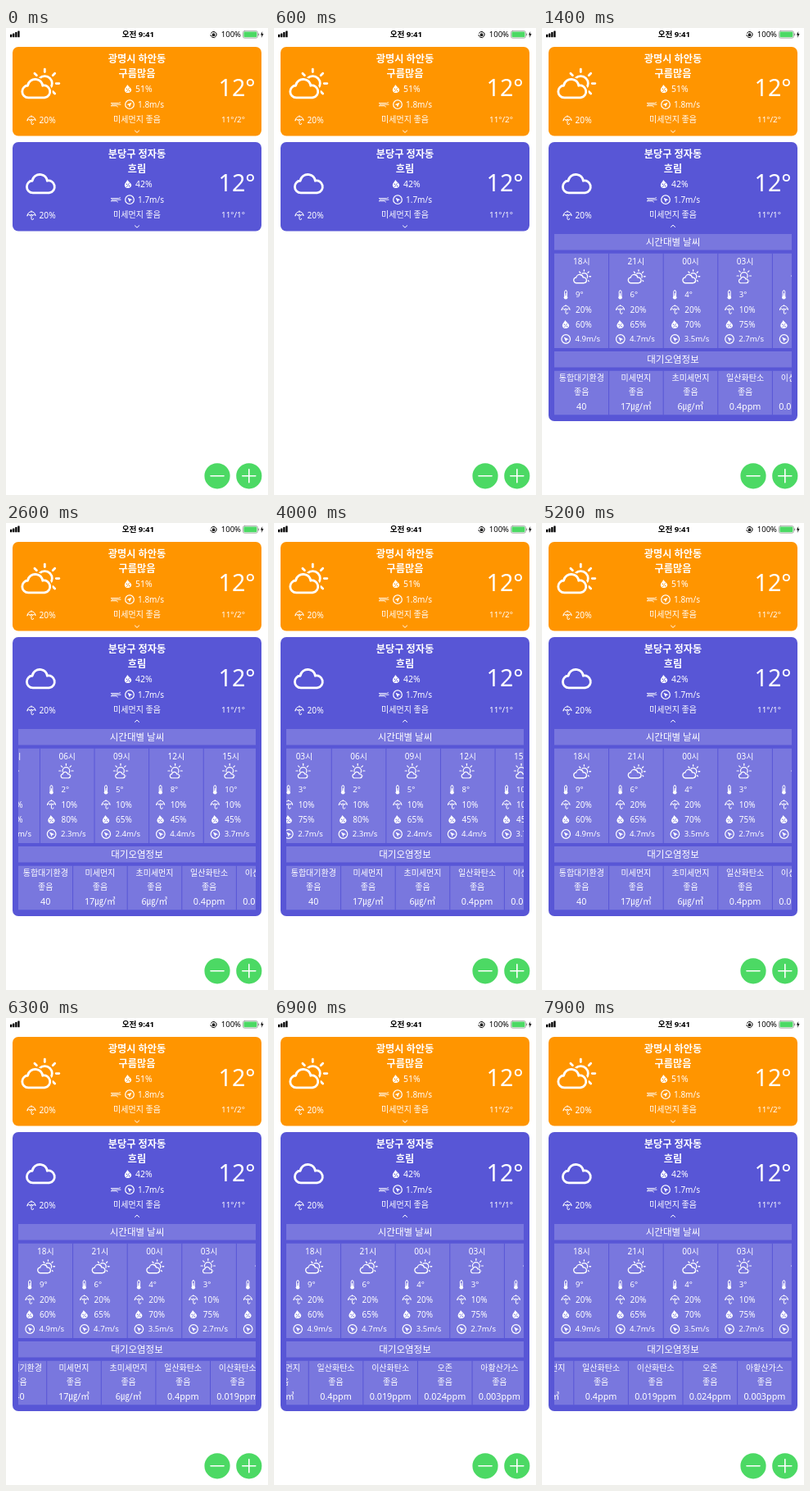
Write an HTML page with a canvas that moves like this. It is 320 px wide and 569 px high and loops after 8 s.

```html
<!DOCTYPE html>
<html lang="ko">
<head>
<meta charset="utf-8">
<title>날씨</title>
<style>
html, body { margin: 0; width: 100%; height: 100%; overflow: hidden; background: #fff; }
canvas { display: block; width: 320px; height: 569px; }
</style>
</head>
<body>
<canvas id="stage"></canvas>
<script>
const W = 320, H = 569, LOOP = 8000, COL = 66.6;
const ORANGE = '#ff9500', INDIGO = '#5856d6', PANEL = '#7977de', GREEN = '#4cd964';
const FONT = '"Noto Sans", "Noto Sans CJK KR", sans-serif';
const canvas = document.getElementById('stage');
const ctx = canvas.getContext('2d');
const dpr = window.devicePixelRatio || 1;
canvas.width = W * dpr;
canvas.height = H * dpr;

const hours = [
  ['18', 9, 20, 60, '4.9'], ['21', 6, 20, 65, '4.7'],
  ['00', 4, 20, 70, '3.5'], ['03', 3, 10, 75, '2.7'],
  ['06', 2, 10, 80, '2.3'], ['09', 5, 10, 65, '2.4'],
  ['12', 8, 10, 45, '4.4'], ['15', 10, 10, 45, '3.7']
];
const air = [
  ['통합대기환경', '40'], ['미세먼지', '17㎍/㎥'], ['초미세먼지', '6㎍/㎥'],
  ['일산화탄소', '0.4ppm'], ['이산화탄소', '0.019ppm'],
  ['오존', '0.024ppm'], ['아황산가스', '0.003ppm']
];

const rad = d => d * Math.PI / 180;
const ease = u => u < 0.5 ? 2 * u * u : 1 - 2 * (1 - u) * (1 - u);
const ramp = (t, from, to) => ease(Math.min(1, Math.max(0, (t - from) / (to - from))));

function text(s, x, y, size, align = 'center', weight = 400, color = '#fff') {
  ctx.font = `${weight} ${size}px ${FONT}`;
  ctx.textAlign = align;
  ctx.fillStyle = color;
  ctx.fillText(s, x, y + size * 0.36);
}

function box(x, y, w, h, r, color) {
  ctx.fillStyle = color;
  ctx.beginPath();
  ctx.roundRect(x, y, w, h, r);
  ctx.fill();
}

function disc(x, y, r, color) {
  ctx.fillStyle = color;
  ctx.beginPath();
  ctx.arc(x, y, r, 0, 7);
  ctx.fill();
}

function line(points, width, color = '#fff') {
  ctx.strokeStyle = color;
  ctx.lineWidth = width;
  ctx.beginPath();
  points.forEach(([x, y]) => ctx.lineTo(x, y));
  ctx.stroke();
}

// Draws with the origin moved to (x, y)
function at(x, y, scale, draw) {
  ctx.save();
  ctx.translate(x, y);
  ctx.scale(scale, scale);
  draw();
  ctx.restore();
}

function cloud(x, y, scale, width, bg) {
  at(x, y, scale, () => {
    ctx.beginPath();
    ctx.arc(8, 17, 8, rad(90), rad(265));
    ctx.arc(17, 11, 10, rad(190), rad(350));
    ctx.arc(28.5, 17, 8, rad(-102), rad(90));
    ctx.closePath();
    ctx.fillStyle = bg;
    ctx.strokeStyle = bg;
    ctx.lineWidth = width / scale * 2.2;
    ctx.fill();
    ctx.stroke();
    ctx.strokeStyle = '#fff';
    ctx.lineWidth = width / scale;
    ctx.stroke();
  });
}

function sun(x, y, r, inner, outer, width, angles) {
  ctx.strokeStyle = '#fff';
  ctx.lineWidth = width;
  ctx.beginPath();
  ctx.arc(x, y, r, 0, 7);
  ctx.stroke();
  for (const a of angles) {
    const c = Math.cos(rad(a)), s = Math.sin(rad(a));
    line([[x + c * inner, y + s * inner], [x + c * outer, y + s * outer]], width);
  }
}

function cloudySun(x, y, scale, width, bg) {
  const k = scale / 0.93;
  sun(x + 27.5 * k, y + 6 * k, 9 * k, 14 * k, 17.5 * k, width, [-135, -90, -45, 0, 45]);
  cloud(x, y, scale, width, bg);
}

function sunnyCloud(x, y) {
  sun(x, y, 4.3, 6.5, 8.7, 1.2, [-180, -135, -90, -45, 0, 45]);
  cloud(x - 6.3, y + 1, 0.31, 1.2, PANEL);
}

function umbrella(x, y) {
  at(x, y, 1, () => {
    ctx.strokeStyle = '#fff';
    ctx.lineWidth = 1;
    ctx.beginPath();
    ctx.arc(0, 0.5, 5, Math.PI, 0);
    for (const cx of [3.4, 0, -3.4]) ctx.arc(cx, 0.5, 1.6, 0, Math.PI, true);
    ctx.moveTo(0, -5.4);
    ctx.lineTo(0, -4.4);
    ctx.moveTo(0, 0);
    ctx.lineTo(0, 4);
    ctx.arc(1.3, 4, 1.3, Math.PI, 0, true);
    ctx.stroke();
  });
}

function drop(x, y, bg) {
  at(x, y, 1, () => {
    ctx.fillStyle = '#fff';
    ctx.beginPath();
    ctx.moveTo(-0.8, -5);
    ctx.bezierCurveTo(1, -2.5, 4.2, -0.5, 4.2, 1.6);
    ctx.bezierCurveTo(4.2, 6.2, -4.2, 6.2, -4.2, 1.4);
    ctx.bezierCurveTo(-4.2, -1, -1.6, -2.5, -0.8, -5);
    ctx.fill();
    line([[1.5, -0.8], [-1.5, 3.6]], 0.8, bg);
    disc(-1.6, 0.3, 0.8, bg);
    disc(1.6, 2.6, 0.8, bg);
  });
}

function compass(x, y, angle) {
  at(x, y, 1, () => {
    ctx.strokeStyle = '#fff';
    ctx.lineWidth = 1.2;
    ctx.beginPath();
    ctx.arc(0, 0, 5.3, 0, 7);
    ctx.stroke();
    ctx.rotate(rad(angle));
    ctx.fillStyle = '#fff';
    ctx.beginPath();
    [[0, -3.6], [2.4, 2.6], [0, 1.3], [-2.4, 2.6]].forEach(p => ctx.lineTo(...p));
    ctx.fill();
  });
}

function wind(x, y) {
  line([[x, y - 1.6], [x + 9.5, y - 1.6], [x + 11.5, y - 2.4]], 0.9);
  line([[x + 1, y], [x + 12, y]], 0.9);
  line([[x, y + 1.6], [x + 7, y + 1.6], [x + 8.5, y + 2.8]], 0.9);
}

function thermometer(x, y) {
  ctx.strokeStyle = '#fff';
  ctx.lineWidth = 1;
  ctx.beginPath();
  ctx.roundRect(x - 1.4, y - 5.2, 2.8, 8, 1.4);
  ctx.stroke();
  disc(x, y + 3.2, 2.3, '#fff');
  line([[x, y - 1.5], [x, y + 3]], 1);
}

function chevron(x, y, dir) {
  line([[x - 2.6, y - 1.2 * dir], [x, y + 1.2 * dir], [x + 2.6, y - 1.2 * dir]], 1);
}

function summary(y, bg, d) {
  text(d.place, 160, y + 14.5, 12.2, 'center', 700);
  text(d.sky, 160, y + 32.5, 12.2, 'center', 700);
  drop(149, y + 51, bg);
  text(d.humid, 158, y + 51, 10.4, 'left');
  wind(128, y + 70.2);
  compass(151, y + 70.2, d.angle);
  text(d.wind, 161, y + 70.2, 10, 'left');
  text('미세먼지 좋음', 160, y + 88.8, 10);
  umbrella(31, y + 89.3);
  text('20%', 40.5, y + 89.5, 10.2, 'left');
  text('12°', 304.5, y + 49.5, 28.6, 'right');
  text(d.range, 277.5, y + 88.6, 9.8);
}

// Row of equal columns, scrolled sideways inside a clipped panel
function strip(y, h, items, scroll, cell) {
  ctx.save();
  ctx.beginPath();
  ctx.rect(15, y, 290, h);
  ctx.clip();
  ctx.fillStyle = PANEL;
  ctx.fillRect(15, y, 290, h);
  items.forEach((item, i) => {
    const x = 15 + i * COL - scroll;
    if (x > 306 || x < 14 - COL) return;
    cell(item, x, i);
    line([[x + COL, y], [x + COL, y + h]], 1, INDIGO);
  });
  ctx.restore();
}

function heading(label, y) {
  ctx.fillStyle = PANEL;
  ctx.fillRect(15, y, 290, 19.5);
  text(label, 160, y + 9.8, 11.5);
}

function hourCell([time, temp, rain, humid, speed], x, i) {
  text(time + '시', x + 33.3, 284, 10);
  if (i < 3) cloudySun(x + 23.7, 300, 0.43, 1.3, PANEL);
  else sunnyCloud(x + 32, 302);
  thermometer(x + 14, 325);
  umbrella(x + 14, 343);
  drop(x + 14, 361, PANEL);
  compass(x + 14.2, 379, -45);
  text(temp + '°', x + 26, 325, 9.6, 'left');
  text(rain + '%', x + 26, 343, 10, 'left');
  text(humid + '%', x + 26, 361, 10, 'left');
  text(speed + 'm/s', x + 25.5, 379, 9.6, 'left');
}

function airCell([name, value], x) {
  const c = x + 33.3;
  text(name, c, 426.5, 10);
  text('좋음', c, 443.5, 10);
  text(value, c, 461.3, 10.8);
}

function statusBar() {
  for (let i = 0; i < 4; i++) {
    const h = 3.5 + i * 1.4;
    box(5 + i * 3.1, 11.3 - h, 2.3, h, 0.5, '#000');
  }
  text('오전 9:41', 161.3, 8, 9.6, 'center', 600, '#000');
  ctx.strokeStyle = '#000';
  ctx.lineWidth = 1;
  ctx.beginPath();
  ctx.arc(253.5, 8, 3.6, rad(-150), rad(170));
  ctx.stroke();
  box(251.8, 7.3, 3.4, 2.6, 0.4, '#000');
  ctx.lineWidth = 0.7;
  ctx.beginPath();
  ctx.arc(253.5, 7.3, 1.1, Math.PI, 0);
  ctx.stroke();
  text('100%', 262.8, 8, 9.5, 'left', 400, '#000');
  ctx.strokeStyle = '#888';
  ctx.beginPath();
  ctx.roundRect(289.4, 3.6, 18, 8.6, 2);
  ctx.stroke();
  box(290.4, 4.6, 16, 6.6, 1.2, GREEN);
  box(308.2, 6.5, 1, 2.8, 0.5, '#888');
  ctx.fillStyle = '#000';
  ctx.beginPath();
  [[313.2, 4], [311, 8.4], [312.6, 8.4], [311.8, 12], [314.6, 7.2], [312.9, 7.2]]
    .forEach(p => ctx.lineTo(...p));
  ctx.fill();
}

function button(x, plus) {
  disc(x, 545.8, 15.6, GREEN);
  line([[x - 8, 545.8], [x + 8, 545.8]], 1.6);
  if (plus) line([[x, 537.8], [x, 553.8]], 1.6);
}

function draw(t) {
  const open = ramp(t, 700, 1000);
  const hourScroll = 243 * (ramp(t, 1680, 2680) - ramp(t, 3745, 4745));
  const airScroll = 176 * ramp(t, 6000, 7000);

  ctx.setTransform(dpr, 0, 0, dpr, 0, 0);
  ctx.lineCap = ctx.lineJoin = 'round';
  ctx.fillStyle = '#fff';
  ctx.fillRect(0, 0, W, H);
  statusBar();

  box(8, 23, 304, 108.5, 7, ORANGE);
  summary(23, ORANGE, {
    place: '광명시 하안동', sky: '구름많음', humid: '51%',
    wind: '1.8m/s', angle: 45, range: '11°/2°'
  });
  cloudySun(19.8, 61.6, 0.93, 2.8, ORANGE);
  chevron(160, 126.2, 1);

  const height = 108.5 + 231.5 * open;
  box(8, 139, 304, height, 7, INDIGO);
  summary(139, INDIGO, {
    place: '분당구 정자동', sky: '흐림', humid: '42%',
    wind: '1.7m/s', angle: -45, range: '11°/1°'
  });
  cloud(25.4, 177.6, 0.93, 2.8, INDIGO);
  chevron(160, open ? 241.3 : 242, open ? -1 : 1);

  if (open) {
    ctx.save();
    ctx.beginPath();
    ctx.roundRect(8, 139, 304, height, 7);
    ctx.clip();
    heading('시간대별 날씨', 251);
    strip(274.5, 115.5, hours, hourScroll, hourCell);
    heading('대기오염정보', 394);
    strip(417.5, 54, air, airScroll, airCell);
    ctx.restore();
  }

  button(258, false);
  button(296.8, true);
}

const start = performance.now();
function tick(now) {
  draw(Math.max(0, now - start) % LOOP);
  requestAnimationFrame(tick);
}
draw(0);
requestAnimationFrame(tick);
</script>
</body>
</html>
```
